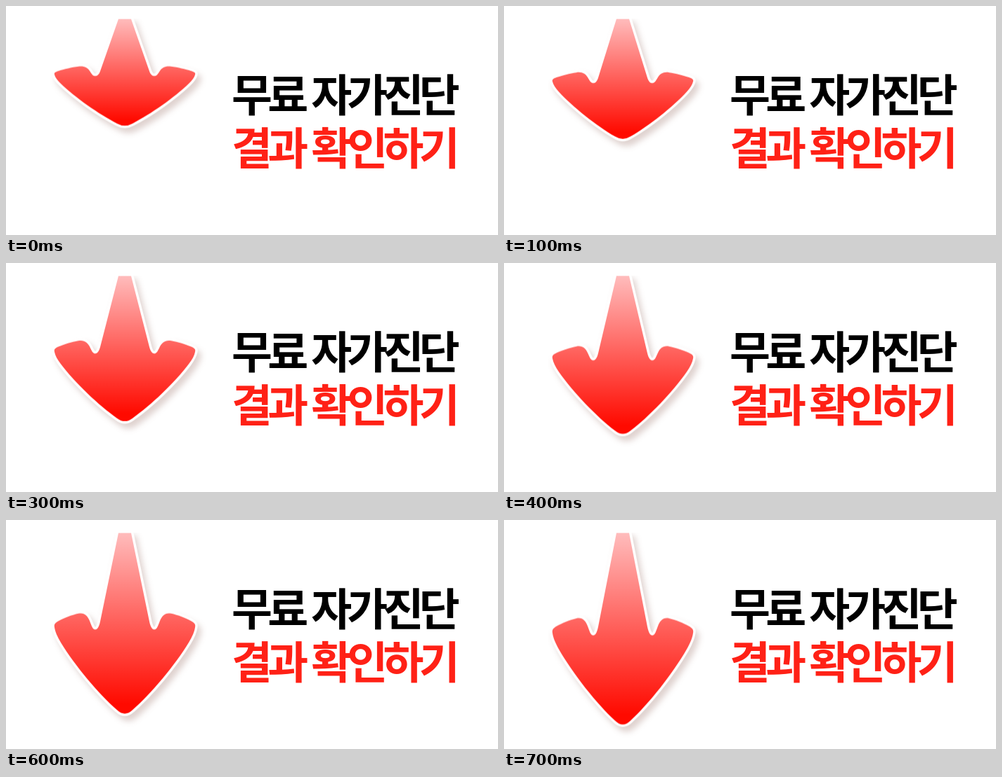
An HTML page without scripts that plays this animation: 700 by 327 pixels, repeating every 0.8 s.

```html
<!DOCTYPE html>
<html lang="ko">
<head>
<meta charset="utf-8">
<title>Growing arrow</title>
<style>
  html, body { margin: 0; width: 100%; height: 100%; overflow: hidden; background: #fff; }
  svg { display: block; width: 700px; height: 327px; }
  .shadow { filter: drop-shadow(5px 7px 4px rgba(110, 50, 35, .22)); }
  .arrow {
    fill: url(#red);
    stroke: #fff;
    stroke-width: 7px;
    stroke-linejoin: round;
    paint-order: stroke;
    vector-effect: non-scaling-stroke;
    transform-origin: 0 0;
    animation: grow 800ms step-end infinite;
  }
  @keyframes grow {
    0%    { transform: scaleY(.557); }
    12.5% { transform: scaleY(.626); }
    25%   { transform: scaleY(.692); }
    37.5% { transform: scaleY(.758); }
    50%   { transform: scaleY(.824); }
    62.5% { transform: scaleY(.886); }
    75%   { transform: scaleY(.943); }
    87.5%, 100% { transform: scaleY(1); }
  }
  text {
    font: 700 63px "Noto Sans CJK KR", "Noto Sans KR", "Noto Sans CJK", "Noto Sans CJK JP", sans-serif;
    letter-spacing: -6.8px;
  }
</style>
</head>
<body>
<svg viewBox="0 0 700 327">
  <defs>
    <linearGradient id="red" x1="0" y1="0" x2="0" y2="1">
      <stop offset="0" stop-color="#ffbcbc"/>
      <stop offset=".95" stop-color="#ff0a00"/>
    </linearGradient>
    <clipPath id="below"><path d="M0 18.5H700V327H0z"/></clipPath>
  </defs>
  <g clip-path="url(#below)">
    <g class="shadow">
      <!-- origin at the middle of the stem's top edge -->
      <g transform="translate(169 18.5)">
        <path class="arrow" d="M-9 0H9L35 134C37 144 40 147 43 146C46 145 47 141 50 133C53 125 58 120 66 122C75 124 87 129 94 133C99 136 101 138 100 143C99 150 96 157 91 166C71 201 37 244 11 268Q0 279-11 268C-37 244-71 201-91 166C-96 157-99 150-100 143C-101 138-99 136-94 133C-87 129-75 124-66 122C-58 120-53 125-50 133C-47 141-46 145-43 146C-40 147-37 144-35 134z"/>
      </g>
    </g>
  </g>
  <text x="321" y="150">무료 자가진단</text>
  <text x="321" y="226" fill="#ff2116">결과 확인하기</text>
</svg>
</body>
</html>
```
